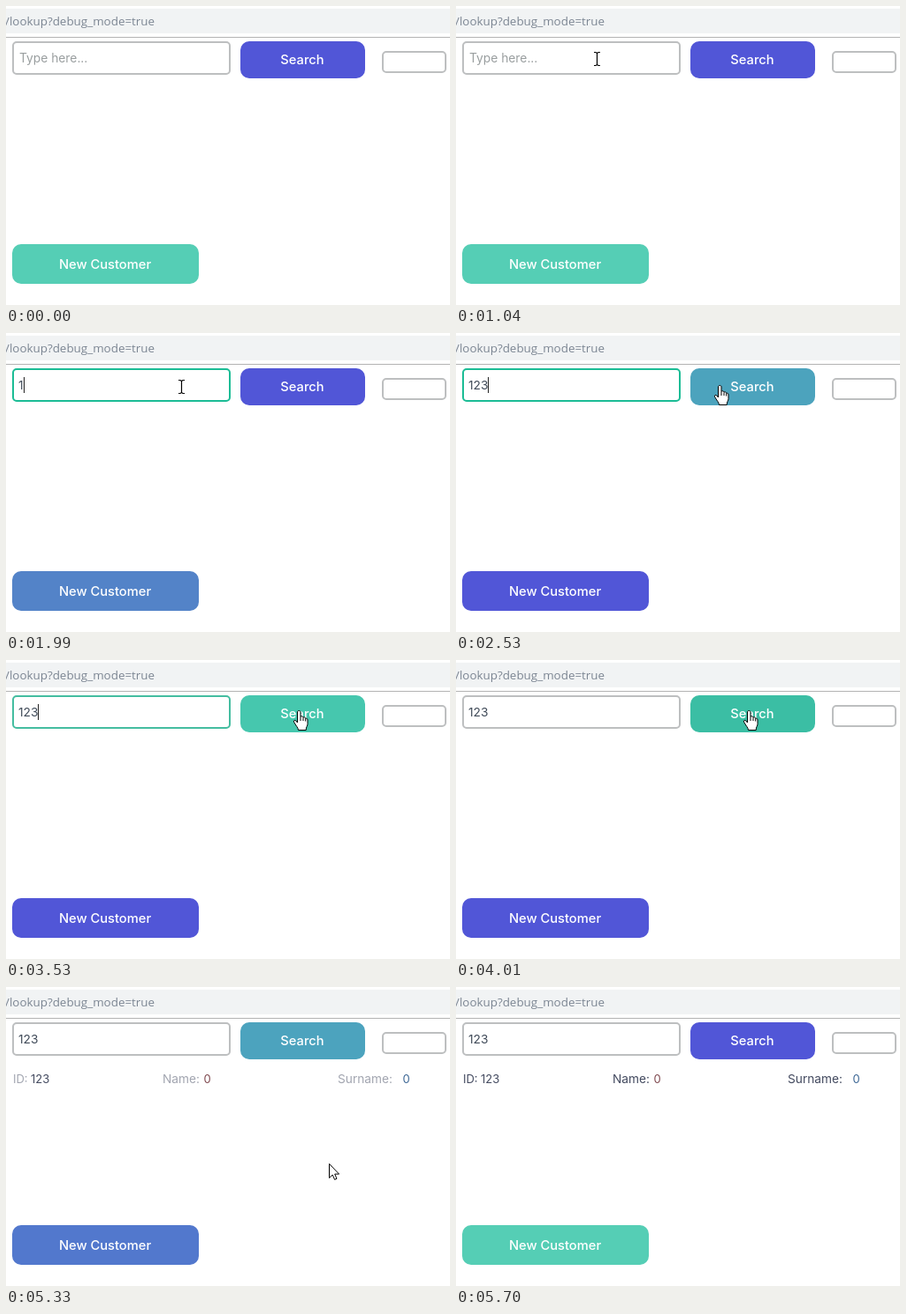
Animation, 502 px wide and 339 px high, one loop 6.56 s. Source, as an HTML page:

```html
<!DOCTYPE html>
<html lang="en">
<head>
<meta charset="utf-8">
<title>Customer lookup</title>
<style>
  html, body { margin: 0; width: 100%; height: 100%; overflow: hidden; background: #fff; }
  svg { display: block; width: 100vw; height: 100vh; }
  text { font-family: Inter, "Open Sans", sans-serif; white-space: pre; }
  .url { font: 13.4px "Open Sans", "Noto Sans", sans-serif; fill: #7b8592; text-anchor: end; }
  .button-text { font-size: 14.7px; font-weight: 500; fill: #fff; text-anchor: middle; }
  .typed { font-size: 13.7px; fill: #3e4957; }
  .hint { font-size: 13.8px; fill: #999e9f; }
  .result { font-size: 13px; fill: #444b60; }
  .label { font-size: 13.7px; }
  .field { fill: #fff; stroke: #bdbfc0; stroke-width: 2; }
</style>
</head>
<body>
<svg viewBox="0 0 502 339" preserveAspectRatio="none">
  <rect width="502" height="339" fill="#fff"/>
  <rect y="3" width="502" height="28" fill="#f1f3f4"/>
  <text class="url" x="168" y="22">/lookup?debug_mode=true</text>
  <rect y="35" width="502" height="1" fill="#b3b3b3"/>

  <rect id="input" class="field" x="8" y="41" width="245" height="36" rx="4"/>
  <text id="hint" class="hint" x="15" y="64">Type here...</text>
  <text id="typed" class="typed" x="14" y="64"></text>
  <rect id="caret" y="50" width="1" height="18" fill="#222"/>

  <rect id="search" x="265" y="40" width="141" height="42" rx="10"/>
  <text class="button-text" x="335" y="66">Search</text>

  <rect class="field" x="426" y="52" width="71" height="23" rx="4"/>
  <text id="echo" class="typed" x="431" y="69">123</text>

  <g id="values" class="result">
    <text x="28" y="109">123</text>
    <text x="223.5" y="109" style="fill:#804a50">0</text>
    <text x="448.5" y="109" style="fill:#3d6795">0</text>
  </g>
  <g id="labels" class="result label">
    <text x="8" y="109" font-size="13">ID:</text>
    <text x="177" y="109">Name:</text>
    <text x="375" y="109">Surname:</text>
  </g>

  <rect id="create" x="7" y="270" width="211" height="45" rx="10"/>
  <text class="button-text" x="112" y="298">New Customer</text>

  <g id="cursor">
    <path id="arrow" d="M.5.5V16.5L4.2 13 6.6 18.4 9 17.3 6.7 12.1H11.6Z" fill="#fff" stroke="#000"/>
    <path id="beam" d="M-3-7.5H-1L.5-6.5 2-7.5H4M.5-6.5V6.5M-3 7.5H-1L.5 6.5 2 7.5H4" fill="none" stroke="#000" stroke-width="1.2"/>
    <path id="hand" d="M-1.5 14V2C-1.5 0 2 0 2 2V7.5C2.5 6.3 5 6.6 5 8.3C5.8 7.4 7.6 7.8 7.7 9.5C8.6 8.7 10 9.3 10 11V15.5C10 18 8.2 18.6 8.2 22.5H-.5C-.7 19.5-3.3 17.5-5.5 13.2C-6.3 11.3-4.2 10.8-3.1 12Z M2 7.5V12M5 8.5V12M7.7 9.5V12.5" fill="#fff" stroke="#000" stroke-linejoin="round"/>
  </g>
</svg>
<script>
const LOOP = 6560;
const $ = id => document.getElementById(id);

// Screen updates arrive in bursts: [start, end, number of updates]
const bursts = [
  [120, 430, 5], [580, 1040, 7], [1190, 1820, 9], [1990, 2610, 9],
  [2840, 2920, 2], [3450, 3770, 5], [3940, 4010, 2], [5180, 5700, 8]
];

const INDIGO = [81, 86, 215], TEAL = [85, 206, 181];
const HOVER = [74, 202, 177], PRESSED = [59, 190, 164];
const GREY = [189, 191, 192], GREEN = [27, 188, 149];

// Each track is a list of [time, values]
const path = [
  [0, [410, 360]], [120, [410, 319]], [430, [290, 178]], [505, [290, 178]],
  [1040, [159, 60]], [1190, [160, 60]], [1500, [198, 61]], [2065, [198, 61]],
  [2530, [317, 59]], [2610, [317, 59]], [2920, [331, 57]],
  [5180, [331, 57]], [5480, [400, 345]]
];
const searchFill = [
  [2300, INDIGO], [2530, [73, 200, 177]], [2610, HOVER], [3450, HOVER],
  [3770, PRESSED], [4010, PRESSED], [5180, HOVER], [5620, INDIGO]
];
const createFill = [
  [1820, TEAL], [1990, [83, 131, 200]], [2150, INDIGO], [5180, INDIGO], [5700, TEAL]
];
const inputStroke = [[1420, GREY], [1740, GREEN], [3450, GREEN], [3770, GREY]];
const labelOpacity = [[5180, [0]], [5480, [1]]];

function lastUpdate(time) {
  let shown = 0;
  for (const [start, end, count] of bursts) {
    if (time < start) break;
    const step = (end - start) / (count - 1);
    shown = Math.min(end, start + step * Math.floor((time - start) / step + 1e-6));
  }
  return shown;
}

function valueAt(track, time) {
  const next = track.findIndex(key => key[0] > time);
  if (next === 0) return track[0][1];
  if (next < 0) return track[track.length - 1][1];
  const [t0, from] = track[next - 1], [t1, to] = track[next];
  const p = (time - t0) / (t1 - t0);
  return from.map((v, i) => v + (to[i] - v) * p);
}

const colour = (track, time) => `rgb(${valueAt(track, time).map(Math.round)})`;
const show = (id, on) => $(id).setAttribute("visibility", on ? "visible" : "hidden");
const between = (v, low, high) => v >= low && v < high;

function drawCursor(time) {
  const [x, y] = valueAt(path, time).map(Math.round);
  const overInput = between(x, 7, 254) && between(y, 40, 78);
  const overSearch = between(x, 265, 406) && between(y, 40, 82);
  $("cursor").setAttribute("transform", `translate(${x} ${y})`);
  show("beam", overInput);
  show("hand", overSearch);
  show("arrow", !overInput && !overSearch);
}

function draw(time) {
  const typed = [1990, 2140, 2290].filter(t => time >= t).length;
  $("typed").textContent = "123".slice(0, typed);
  show("hint", !typed);
  $("caret").setAttribute("x", [15, 20, 28, 36][typed]);
  show("caret", between(time, 1500, 2840) || between(time, 3450, 3600));

  $("input").style.stroke = colour(inputStroke, time);
  $("search").style.fill = colour(searchFill, time);
  $("create").style.fill = colour(createFill, time);
  show("echo", between(time, 3600, 4010));
  show("values", time >= 5180);
  $("labels").setAttribute("opacity", valueAt(labelOpacity, time)[0]);
  drawCursor(time);
}

const began = performance.now();
function tick() {
  draw(lastUpdate((performance.now() - began) % LOOP));
  requestAnimationFrame(tick);
}
tick();
</script>
</body>
</html>
```
